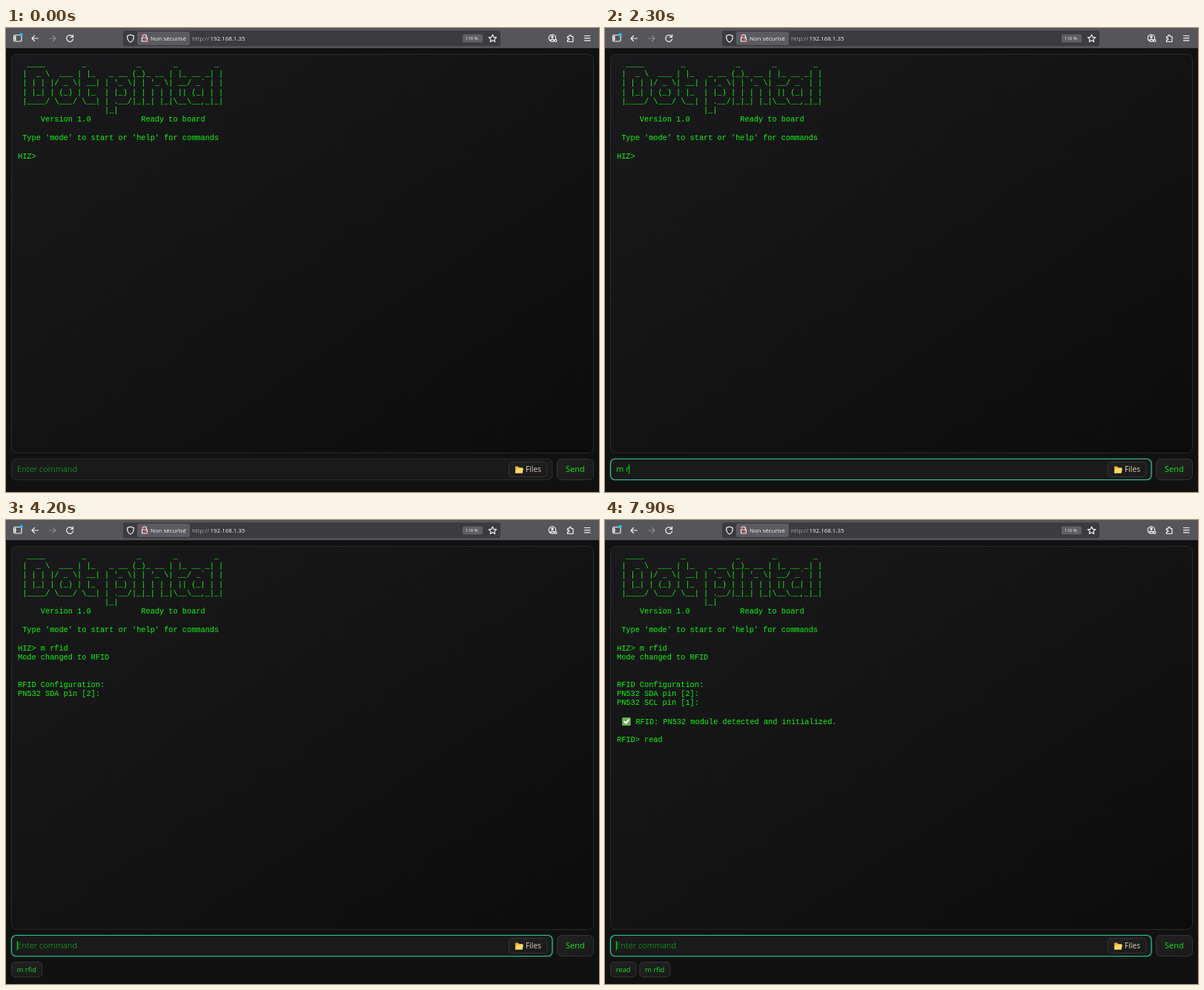
An HTML page that plays this animation: 800x625 px, repeating every 8 s.

```html
<!DOCTYPE html>
<html lang="fr">
<head>
<meta charset="utf-8">
<title>Terminal</title>
<style>
  html, body { margin: 0; width: 100%; height: 100%; overflow: hidden; background: #111112; }
  svg { position: absolute; left: 0; top: 0; width: 800px; height: 625px; }
  text { font-family: "Open Sans", sans-serif; white-space: pre; }
  pre {
    position: absolute; left: 16px; top: 44px; margin: 0; color: #10f510;
    font: 16px/19.2px "Liberation Mono", monospace;
    transform: scale(.6417); transform-origin: 0 0;
  }
  pre i {
    display: inline-block; position: relative; width: 18px; height: 17px; margin: 0 1.2px;
    vertical-align: -3px; border-radius: 2px; background: #6cb052;
  }
  pre i::after {
    content: ""; position: absolute; left: 6px; top: 1px; width: 4px; height: 9px;
    border: solid #fff; border-width: 0 3px 3px 0; transform: rotate(42deg);
  }
  .icon { fill: none; stroke: #f4f4f6; stroke-width: 1.2; stroke-linecap: round; stroke-linejoin: round; }
  .box { fill: url(#key); stroke: #343436; }
  .green { fill: #12e51a; }
</style>
</head>
<body>
<svg viewBox="0 0 800 625">
  <defs>
    <linearGradient id="screen" x1="0" y1="0" x2="1" y2="1">
      <stop offset="0" stop-color="#1a1a1c"/><stop offset="1" stop-color="#0c0c0d"/>
    </linearGradient>
    <linearGradient id="key" x1="0" y1="0" x2="1" y2="1">
      <stop offset="0" stop-color="#222223"/><stop offset="1" stop-color="#19191a"/>
    </linearGradient>
    <filter id="glow" x="-2%" y="-30%" width="104%" height="160%"><feGaussianBlur stdDeviation="1.2"/></filter>
  </defs>

  <!-- browser toolbar -->
  <rect width="800" height="27.5" fill="#56555a"/>
  <rect y="27" width="800" height="1" fill="#1c1b1f"/>
  <rect x="158" y="3.5" width="509" height="21" rx="3" fill="#3c3b40"/>
  <rect x="177" y="5" width="71" height="18" rx="2.5" fill="#5c5b61"/>
  <rect x="616" y="8.5" width="27" height="11" rx="2" fill="#615f65"/>
  <g class="icon">
    <rect x="10.5" y="9.5" width="10.5" height="8.5" rx="1.5"/>
    <path d="M12.5 11.5v4.5" stroke-width="2"/>
    <path d="M43.5 14h-8.5m3.5-3.5l-3.5 3.5 3.5 3.5"/>
    <path d="M58.5 14h8.5m-3.5-3.5l3.5 3.5-3.5 3.5" stroke="#8d8c92"/>
    <path d="M89.8 11.5a4.4 4.4 0 1 0 .7 3.3M90.5 9v3.3h-3.3"/>
    <path d="M168 9l4.3 1.6c.3 4-1.2 7-4.3 8.6-3.1-1.6-4.6-4.6-4.3-8.6z"/>
    <path d="M184.5 13v-1.5a2.5 2.5 0 0 1 5 0V13m-6 0h7v5h-7z"/>
    <path d="M183 9.5l8.5 9" stroke="#ff5468"/>
    <path d="M656.5 9l1.5 3.3 3.6.4-2.7 2.4.8 3.5-3.2-1.8-3.2 1.8.8-3.5-2.7-2.4 3.6-.4z"/>
    <circle cx="737" cy="13.5" r="4.7"/><circle cx="737" cy="12" r="1.2" fill="#f4f4f6"/>
    <path d="M734.5 16.3q2.500-2 5 0" stroke-width="1.600"/>
    <circle cx="741.500" cy="17" r="1.500" fill="#56555a"/>
    <path d="M757.5 11.5h2.2v-.8a1.4 1.4 0 0 1 2.8 0v.8h2.5v7h-7.5v-2.3h1a1.3 1.3 0 0 0 0-2.6h-1z"/>
    <path d="M780.5 10.5h7.5m-7.5 3.2h7.5m-7.5 3.2h7.5"/>
  </g>
  <circle cx="20.5" cy="9" r="2.2" fill="#20c4e8"/>
  <g font-size="7.9" fill="#f4f4f6">
    <text x="195" y="16.7">Non sécurisé</text>
    <text x="251" y="16.7"><tspan fill="#a9a8ae">http://</tspan><tspan x="275.5">192.168.1.35</tspan></text>
    <text x="620" y="16.2" font-size="6">110 %</text>
  </g>

  <rect id="panel" x="7.5" y="35.5" width="785" height="537" rx="7" fill="url(#screen)" stroke="#2b2b2d"/>

  <!-- command row -->
  <g id="row">
    <rect id="halo" x="7.5" y=".5" width="729.5" height="28" rx="6" fill="none" stroke="#16a06c" stroke-opacity=".5" stroke-width="1.5" filter="url(#glow)"/>
    <rect id="field" x="7.5" y=".5" width="729.5" height="28" rx="6" fill="#1a1a1b"/>
    <text id="typed" x="15" y="18.2" font-size="10.85"></text>
    <rect id="caret" y="8" width="1" height="12.5" fill="#12e51a"/>
    <rect class="box" x="678.5" y="4.5" width="51.5" height="20" rx="4.5"/>
    <path d="M687 10.5h4l1.5 1.5h4.5v7.5h-10z" fill="#e8ae35"/>
    <path d="M689 13.2h9l-1.500 6.300h-9.500z" fill="#ffdb6c"/>
    <text x="701" y="18.3" font-size="10.2" fill="#e2d3b4">Files</text>
    <rect class="box" x="743.5" y=".5" width="49" height="28" rx="6"/>
    <text class="green" x="755" y="18.2" font-size="11">Send</text>
  </g>

  <!-- command history -->
  <g id="readChip">
    <rect class="box" x="7.5" y="595.5" width="34.5" height="20" rx="4.5"/>
    <text class="green" x="14.8" y="608.7" font-size="9.2">read</text>
  </g>
  <g id="modeChip">
    <rect class="box" x="7.5" y="595.5" width="41" height="20" rx="4.5"/>
    <text class="green" x="14.8" y="608.7" font-size="9.3">m rfid</text>
  </g>
</svg>
<pre>
  ____        _           _       _        _
 |  _ \  ___ | |_   _ __ (_)_ __ | |_ __ _| |
 | | | |/ _ \| __| | '_ \| | '_ \| __/ _` | |
 | |_| | (_) | |_  | |_) | | | | | || (_| | |
 |____/ \___/ \__| | .__/|_|_| |_|\__\__,_|_|
                   |_|
     Version 1.0           Ready to board

 Type 'mode' to start or 'help' for commands

<span id="log"></span></pre>
<script>
const LOOP = 8000, FOCUS = 1100, FIRST_SEND = 3100, SECOND_SEND = 7800;

const output = [
  [0, "HIZ&gt;"],
  [FIRST_SEND, " m rfid"],
  [3200, "\nMode changed to RFID\n\n\nRFID Configuration:\nPN532 SDA pin [2]:"],
  [4400, "\nPN532 SCL pin [1]:"],
  [5100, "\n\n <i></i> RFID: PN532 module detected and initialized.\n\nRFID&gt;"],
  [SECOND_SEND, " read"]
];
const typing = [
  { text: "m rfid", keys: [1900, 2100, 2300, 2400, 2600, 2700], sent: FIRST_SEND },
  { text: "read", keys: [6600, 6800, 7000, 7200], sent: SECOND_SEND }
];
const caretOff = [[0, FOCUS], [3600, 4200], [5700, 6300]];

const $ = id => document.getElementById(id);
const show = (id, on) => $(id).setAttribute("visibility", on ? "visible" : "hidden");
let shownLog = "";

function draw(t) {
  const log = output.filter(([at]) => t >= at).map(([, text]) => text).join("");
  if (log !== shownLog) $("log").innerHTML = shownLog = log;

  const entry = typing.find(e => t >= e.keys[0] && t < e.sent);
  const value = entry ? entry.text.slice(0, entry.keys.filter(k => t >= k).length) : "";
  const typed = $("typed");
  typed.textContent = value || "Enter command";
  typed.setAttribute("fill", value ? "#12e51a" : "#118a1c");
  $("caret").setAttribute("x", 14.8 + (value ? typed.getComputedTextLength() : 0));
  show("caret", !caretOff.some(([from, to]) => t >= from && t < to));

  const focused = t >= FOCUS;
  show("halo", focused);
  $("field").setAttribute("stroke", focused ? "#3abb94" : "#2b2b2d");
  $("field").setAttribute("stroke-width", focused ? 1.2 : 1);

  const hasHistory = t >= FIRST_SEND, hasRead = t >= SECOND_SEND;
  $("panel").setAttribute("height", hasHistory ? 516 : 537);
  $("row").setAttribute("transform", `translate(0 ${hasHistory ? 559 : 580})`);
  show("modeChip", hasHistory);
  show("readChip", hasRead);
  $("modeChip").setAttribute("transform", `translate(${hasRead ? 39.3 : 0} 0)`);
}

const start = performance.now();
function tick() {
  draw((performance.now() - start) % LOOP);
  requestAnimationFrame(tick);
}
tick();
</script>
</body>
</html>
```
